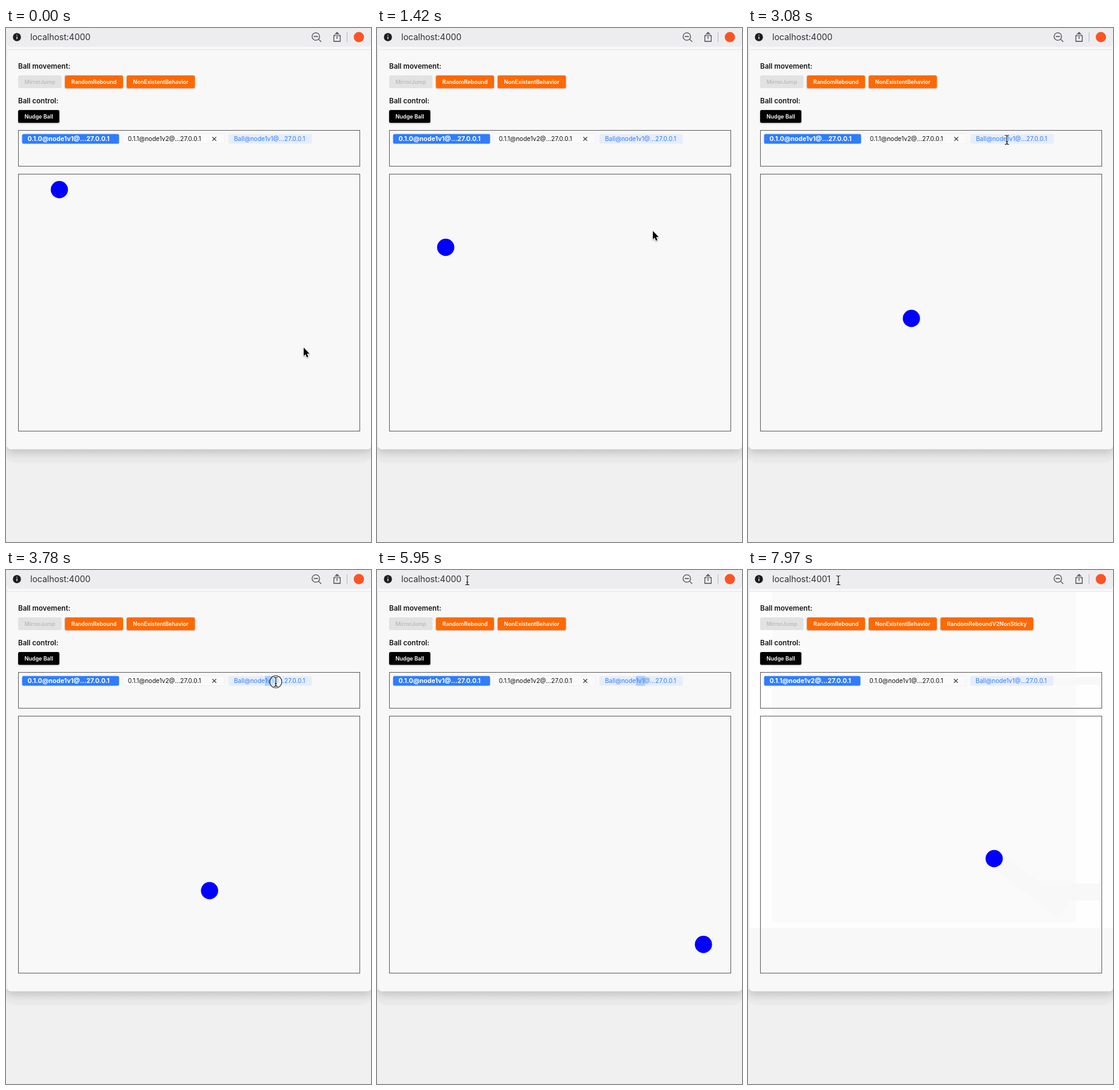
Recreate the animation shown at these times as an HTML page. Size 602x846 px, loop 8000 ms.

```html
<!DOCTYPE html>
<html lang="en">
<head>
<meta charset="utf-8">
<title>Bouncing ball</title>
<style>
  html, body { margin: 0; width: 100%; height: 100%; overflow: hidden; background: #f0f0f0; }
  svg { display: block; width: 602px; height: 846px; font-family: Inter, sans-serif; }
  .head { font-size: 11.6px; font-weight: 600; fill: #161616; }
  .btn text { font-size: 9px; font-weight: 600; fill: #fff; text-anchor: middle; }
  .btn rect { filter: drop-shadow(0 1px 1.2px rgba(0, 0, 0, .3)); }
  .btn.off rect { filter: none; }
  .btn.off text { fill: #bdbdbd; }
  .tab { font-size: 10.1px; }
  .url { font-size: 14px; fill: #303034; }
  .line { fill: none; stroke: #5c5c5c; }
  .icon { fill: none; stroke: #4c4c52; stroke-width: 1.3; stroke-linecap: round; stroke-linejoin: round; }
  .panel { filter: drop-shadow(0 5px 7px rgba(0, 0, 0, .17)); }
</style>
</head>
<body>
<svg viewBox="0 0 602 846">
  <defs>
    <linearGradient id="shade" x1="0" y1="0" x2="0" y2="1">
      <stop offset="0" stop-color="#e2e2e2"/>
      <stop offset="1" stop-color="#ebebeb"/>
    </linearGradient>
  </defs>

  <rect width="602" height="846" fill="#f0f0f0"/>
  <rect x="-2" y="660" width="606" height="56.5" rx="18" fill="url(#shade)"/>
  <rect class="panel" x="2" y="-20" width="600" height="713.5" rx="6" fill="#f8f8f8"/>
  <rect x="0" y="0" width="2" height="690" fill="#ececec"/>
  <path d="M2 35.5H602" stroke="#e6e6e8"/>

  <g id="wash">
    <rect x="2" y="36" width="600" height="553" fill="#fefefe"/>
    <g id="inner">
      <rect x="40" y="36" width="501.500" height="544" fill="#fafafa"/>
      <path id="trail" fill="none" stroke="#f8f8f8" stroke-width="28" stroke-linejoin="round"/>
    </g>
    <path id="bands" fill="#f8f8f8" d="M490 516H583V544H490ZM505 176H583V189H505Z"/>
  </g>

  <rect id="bar" x="2" y="-10" width="600" height="41" rx="6" fill="#ededf0"/>
  <rect id="ring" x="2" y="1" width="599.500" height="29.500" rx="6" fill="#fdfdfd" stroke="#5f55f2" stroke-width="2"/>
  <rect id="urlSel" x="40" y="6.500" width="100" height="18" fill="#a9d0f9"/>
  <circle cx="18" cy="15" r="6.700" fill="#1d1d20"/>
  <path d="M18 14.200V18.300M18 11.300V12.500" stroke="#fff" stroke-width="1.400"/>
  <text id="url" class="url" x="40" y="20"></text>
  <g class="icon">
    <circle cx="511" cy="14" r="6.200"/>
    <path d="M508 14H514M515.600 18.600L519.500 22.300"/>
    <path d="M543.500 12.500H540.700V22H551.300V12.500H548.500M546 17.500V7.500M543 10.200L546 7.200 549 10.200"/>
  </g>
  <path d="M562.500 7V23" stroke="#b9b9be"/>
  <circle cx="582" cy="15" r="8.500" fill="#fb5424"/>

  <text class="head" x="20" y="67">Ball movement:</text>
  <text class="head" x="20" y="124">Ball control:</text>
  <g id="buttons"></g>

  <rect class="line" x="20.500" y="168.500" width="563" height="59"/>
  <rect class="line" x="20.500" y="240.500" width="563" height="423"/>

  <rect x="26.500" y="174.500" width="160" height="16" rx="2.500" fill="#2f7dfc" id="tabA"/>
  <text id="nameA" x="35.500" y="186" font-size="10.500" font-weight="700" fill="#fff"></text>
  <g id="tabs">
    <rect x="192.500" y="174.500" width="168" height="16" rx="2.500" fill="#fafafa" stroke="#f1f1f1"/>
    <text id="nameB" class="tab" x="201" y="186" fill="#111"></text>
    <path d="M340.300 179.300L346.700 185.700M346.700 179.300L340.300 185.700" stroke="#222" stroke-width="1.100"/>
    <rect x="367" y="174.500" width="137.500" height="16" rx="2.500" fill="#e6edfb"/>
    <rect id="textSel" x="427" y="174.500" height="16"/>
    <text class="tab" x="376" y="186" fill="#2f7dfc">Ball@node1v1@...27.0.0.1</text>
  </g>

  <circle id="ball" r="14.200" fill="#00f"/>

  <g id="cursor">
    <circle id="press" r="10" fill="#fff" fill-opacity=".45" stroke="#222" stroke-width="1.200"/>
    <g id="arrow" style="filter:drop-shadow(0 1px 1px rgba(0,0,0,.35))">
      <path d="M0 0V13.700L3 10.900 5.200 15.900 7.500 14.900 5.400 10H9.500Z" fill="#000"
            stroke="#fff" stroke-width="1.600" paint-order="stroke" stroke-linejoin="round"/>
    </g>
    <g id="beam" fill="none" stroke-linecap="round">
      <path d="M-3 -7.500Q0 -7.500 0 -5.500Q0 -7.500 3 -7.500M0 -5.500V5.500M-3 7.500Q0 7.500 0 5.500Q0 7.500 3 7.500M-1.500 3H1.500" stroke="#fff" stroke-width="2.600"/>
      <path d="M-3 -7.500Q0 -7.500 0 -5.500Q0 -7.500 3 -7.500M0 -5.500V5.500M-3 7.500Q0 7.500 0 5.500Q0 7.500 3 7.500M-1.500 3H1.500" stroke="#111" stroke-width="1.200"/>
    </g>
  </g>
</svg>

<script>
const LOOP = 8000, FIRST = 100, STEP = 87.3;
const FOCUS = 76, SELECT = 77, ERASE = 85, TYPE = 87, LOAD = 89;

// Rows: tick, x, y
const BALL = [
  [0, 88, 266], [6, 40, 303], [7, 40, 305], [16, 113.3, 361], [26, 195, 422],
  [43, 335.7, 527.7], [62, 491, 645], [63, 499, 645.5], [68, 538.4, 616.3],
  [71, 563, 598], [72, 562, 592], [82, 479.3, 529.8], [91, 406, 475]
];
const POINTER = [
  [0, 491, 526], [11, 491, 526], [16, 455, 334], [20, 439, 284], [26, 401, 238],
  [30, 424, 186], [33, 427, 184], [36, 427, 184], [40, 439, 184], [43, 445, 184],
  [50, 445, 184], [52, 400, 150], [57, 170, 30], [59, 149, 17], [91, 149, 17]
];

const $ = id => document.getElementById(id);
const show = (id, on) => $(id).setAttribute('visibility', on ? 'inherit' : 'hidden');
const move = (id, [x, y]) => $(id).setAttribute('transform', `translate(${x} ${y})`);
const within = (n, from, to) => n >= from && n < to;

function at(path, n) {
  let i = 1;
  while (i < path.length - 1 && path[i][0] < n) i++;
  const [t0, x0, y0] = path[i - 1], [t1, x1, y1] = path[i];
  const k = Math.min(1, (n - t0) / (t1 - t0));
  return [x0 + (x1 - x0) * k, y0 + (y1 - y0) * k];
}

function button(x, y, w, label, fill, { off = '', id = '' } = {}) {
  return `<g class="btn ${off}" id="${id || label.replace(' ', '')}">
    <rect x="${x}" y="${y}" width="${w}" height="21" rx="2.5" fill="${fill}"/>
    <text x="${x + w / 2}" y="${y + 13.8}">${label}</text></g>`;
}

const ORANGE = '#ff6900';
$('buttons').innerHTML =
  button(20, 78, 71.5, 'MirrorJump', '#e2e2e2', { off: 'off' }) +
  button(97.2, 78, 95.8, 'RandomRebound', ORANGE) +
  button(199, 78, 112.5, 'NonExistentBehavior', ORANGE) +
  button(317.5, 78, 153, 'RandomReboundV2NonSticky', ORANGE, { id: 'extra' }) +
  button(20, 135, 68, 'Nudge Ball', '#000');

function draw(n) {
  const loaded = n >= LOAD;
  const focused = within(n, FOCUS, LOAD);
  const ball = at(BALL, n), pointer = at(POINTER, n);

  move('ball', ball);
  move('cursor', pointer);
  const beam = within(n, 30, 51) || n >= 58;
  show('beam', beam);
  show('arrow', !beam);
  show('press', within(n, 36, 46) || within(n, FOCUS, FOCUS + 2));

  // Address bar
  show('ring', focused);
  show('urlSel', within(n, SELECT, ERASE));
  $('url').textContent = 'localhost:400' + (n < ERASE ? '0' : n < TYPE ? '' : '1');

  // Selected part of the last tab
  const picked = n < 36 || loaded ? 0 : Math.min(15.5, pointer[0] - 427);
  $('textSel').setAttribute('width', n > 46 && !loaded ? 15.5 : Math.max(0, picked));
  $('textSel').setAttribute('fill', focused ? '#c9ced8' : '#a9cffb');

  // Tabs and buttons of the two pages
  const older = '0.1.0@node1v1@...27.0.0.1', newer = '0.1.1@node1v2@...27.0.0.1';
  $('nameA').textContent = loaded ? newer : older;
  $('nameB').textContent = loaded ? older : newer;
  $('tabA').setAttribute('width', loaded ? 159 : 160);
  move('tabs', [loaded ? -0.7 : 0, 0]);
  show('extra', loaded);

  // Faint tint left behind on the page
  show('wash', n >= FOCUS);
  show('inner', n >= SELECT);
  show('bands', loaded);
  $('trail').setAttribute('d', `M521 561L479 530${n > 82 ? 'L' + ball : ''}`);
  if (n < 82) $('trail').setAttribute('d', `M521 561L${ball}`);
}

const start = performance.now();
let last = -1;
function frame() {
  const t = (performance.now() - start) % LOOP;
  const n = Math.max(0, Math.floor((t - FIRST) / STEP) + 1);
  if (n !== last) draw(last = n);
  requestAnimationFrame(frame);
}
frame();
</script>
</body>
</html>
```
